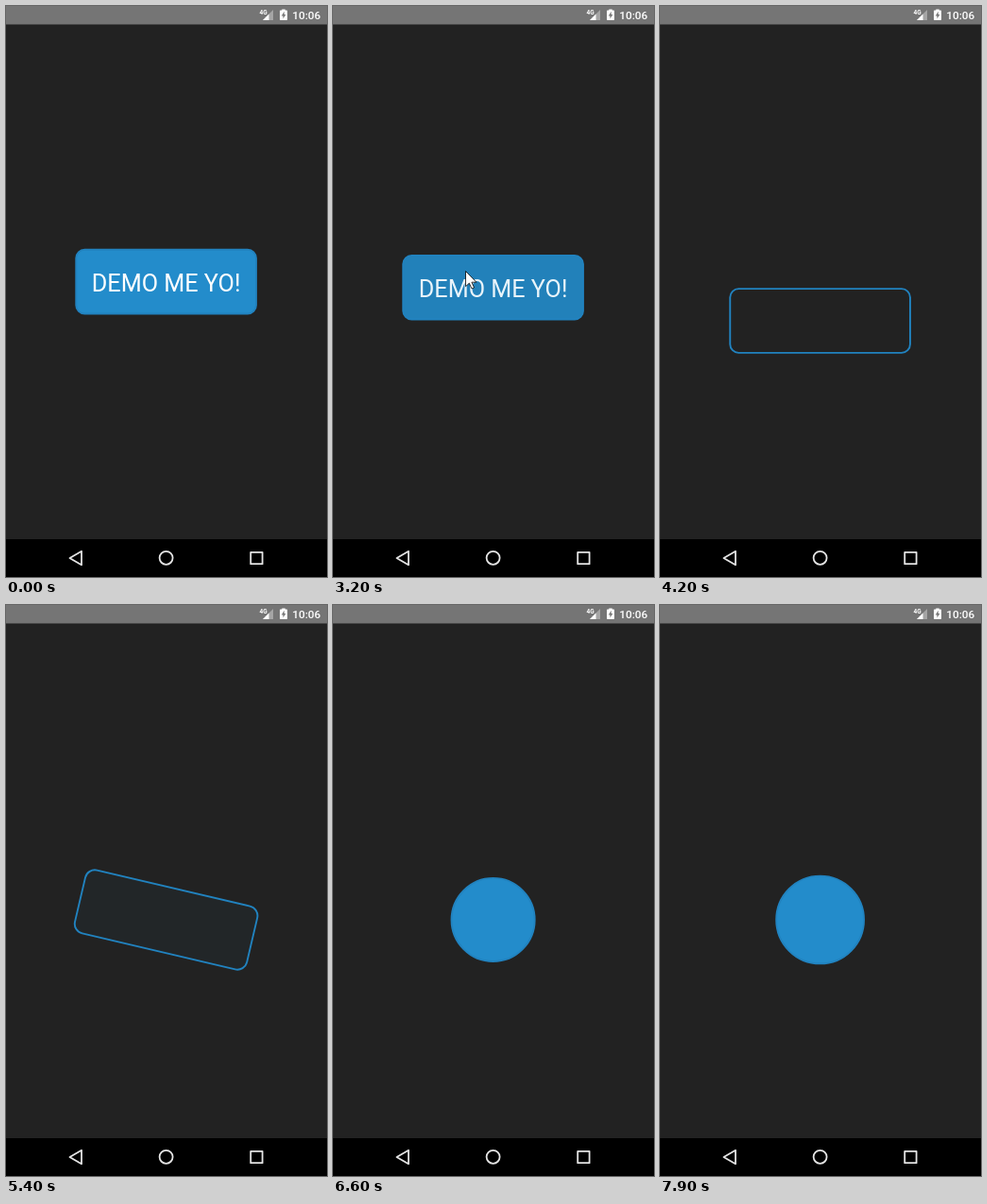
Animation, 340 px wide and 604 px high, one loop 8000 ms. Source, as an HTML page:

```html
<!DOCTYPE html>
<html lang="en">
<head>
<meta charset="utf-8">
<title>Button demo</title>
<style>
  html, body { margin: 0; width: 100%; height: 100%; overflow: hidden; background: #222; }
  svg { display: block; width: 100%; height: 100%; font-family: Roboto, sans-serif; }
</style>
</head>
<body>
<svg viewBox="0 0 340 604">
  <rect width="340" height="604" fill="#222"/>

  <g id="status" fill="#fff">
    <rect width="340" height="19.5" fill="#757575"/>
    <text x="268.5" y="9" font-size="6.5" font-weight="700">4G</text>
    <path d="M283 4V15H272Z" opacity=".35"/>
    <path d="M278.5 8.5V15H272Z"/>
    <path d="M292.3 4.4V3.4H295.7V4.4H297.2Q298 4.4 298 5.2V14.2Q298 15 297.2 15H290.8Q290 15 290 14.2V5.2Q290 4.4 290.8 4.4Z"/>
    <path d="M294.7 5.8L291.8 10.4H293.5V13.6L296.3 9H294.7Z" fill="#757575"/>
    <text x="303.3" y="14" font-size="11.8" font-weight="500">10:06</text>
  </g>

  <g id="navigation" fill="none" stroke="#e4e4e4" stroke-width="1.8" stroke-linejoin="round">
    <rect y="564" width="340" height="40" fill="#000" stroke="none"/>
    <path d="M67.5 584L80 576.8V591.2Z"/>
    <circle cx="169.6" cy="583.8" r="7"/>
    <rect x="259.2" y="577.8" width="12.4" height="12.4"/>
  </g>

  <g id="button">
    <rect id="shape" fill="#238ccb" stroke="#2183c0" stroke-width="1.9"/>
    <text id="label" y="10" font-size="25.2" text-anchor="middle">DEMO ME YO!</text>
  </g>

  <path id="cursor" d="M0 0V16.2L3.8 12.7L6.5 18.5L9 17.4L6.4 11.7H11.4Z" fill="#fff" stroke="#000" stroke-width=".8"/>
</svg>
<script>
const LOOP = 8000, STEP = 100;
const CENTER_X = 169.6, TOP_Y = 291.6, DROP = 41.4;
const BORDER = 1.9, CIRCLE = 94.4;

const [button, shape, label, cursor] =
  ['button', 'shape', 'label', 'cursor'].map(id => document.getElementById(id));

const progress = (t, from, to) => Math.min(1, Math.max(0, (t - from) / (to - from)));
const mix = (a, b, p) => a + (b - a) * p;
const ease = p => (1 - Math.cos(Math.PI * p)) / 2;

function spring(ms) {
  const a = Math.max(0, ms) * 0.009;
  return 1 - Math.exp(-a) * (Math.cos(a) + Math.sin(a));
}

function drawButton(t) {
  const drop = spring(t - 3150);
  const clear = progress(t, 3150, 3650);
  const morph = ease(progress(t, 5308, 6058));
  const pulse = t < 6600 ? 1 : 1 - 0.046 * Math.cos(Math.PI * (t - 6600) / 515);

  const width = mix(192.6, CIRCLE, morph) - BORDER;
  const height = mix(69.6, CIRCLE, morph) - BORDER;
  const attributes = {
    x: -width / 2, y: -height / 2, width, height,
    rx: mix(10, CIRCLE / 2, morph) - BORDER / 2,
    'fill-opacity': Math.max(1 - clear, morph)
  };
  for (const name in attributes) shape.setAttribute(name, attributes[name]);

  button.setAttribute('transform',
    `translate(${CENTER_X} ${TOP_Y + DROP * drop}) rotate(${360 * morph}) scale(${pulse})`);

  const color = [35, 140, 203].map(c => Math.round(mix(255, c, clear)));
  label.setAttribute('fill', `rgb(${color})`);
  label.setAttribute('opacity', 1 - progress(t, 3450, 4000));
}

function drawCursor(t) {
  const move = ease(progress(t, 2500, 2800));
  cursor.setAttribute('visibility', t >= 2500 && t < 3800 ? 'visible' : 'hidden');
  cursor.setAttribute('transform',
    `translate(${mix(21.5, 140.5, move)} ${mix(310.5, 280.5, move)})`);
}

function frame() {
  const t = Math.floor(performance.now() % LOOP / STEP) * STEP;
  drawButton(t);
  drawCursor(t);
  requestAnimationFrame(frame);
}
frame();
</script>
</body>
</html>
```
